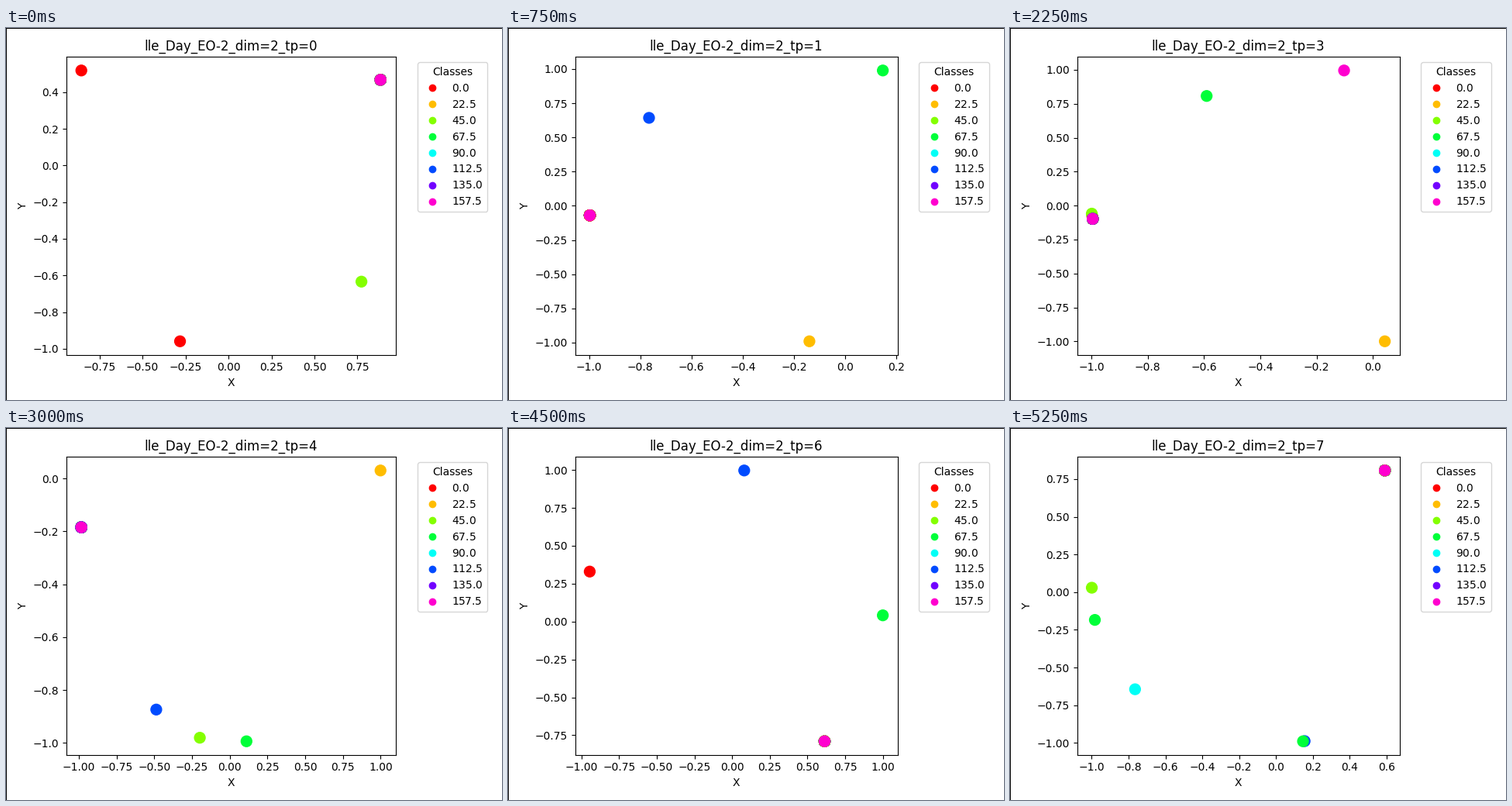
Write a matplotlib script that moves like this. It is 640 px wide and 480 px high and loops after 6 s.

```python
import random

import matplotlib.pyplot as plt
import numpy as np
from matplotlib.animation import FuncAnimation

STEP = 22.5
RED, ORANGE, LIME, GREEN, CYAN, BLUE, PURPLE, PINK = range(8)

# Nearly all points share one angle; a few outliers lie elsewhere on the circle.
SPARSE = {
    0: (27.85, {RED: (148.8, 253.65), LIME: (320.65,)}),
    1: (184, {GREEN: (81.5,), ORANGE: (262,), BLUE: (140,)}),
    3: (185.6, {GREEN: (126.2,), PINK: (95.9,), ORANGE: (272.4, 184.3),
                LIME: (183.4,)}),
    4: (190.63, {ORANGE: (1.75,), BLUE: (240.9,), LIME: (258.6,),
                 GREEN: (276.4,)}),
    5: (25, {RED: (152,), GREEN: (262,), CYAN: (320,)}),
    6: (307.8, {BLUE: (85.4,), RED: (160.75,), GREEN: (2.35,)}),
    7: (53.85, {LIME: (178.3,), CYAN: (220.1,), BLUE: (278.9,),
                GREEN: (190.6, 278.4)}),
}

# Evenly spaced arcs of the full ring: class, first angle, last angle, count.
ARCS = [
    (PURPLE, 57, 129, 5), (PURPLE, 297, 343, 2),
    (LIME, 62, 177, 7),
    (RED, 3.4, 11.2, 2), (RED, 275.2, 275.2, 1),
    (CYAN, 115, 231, 4), (CYAN, 292, 309, 2),
    (GREEN, 51, 237, 2), (GREEN, 97, 198, 9),
    (BLUE, 57.5, 104, 7), (BLUE, 129, 220, 5),
    (ORANGE, 43, 47, 3), (ORANGE, 154, 174, 2), (ORANGE, 205, 209, 3),
    (PINK, 163.5, 222, 2), (PINK, 26, 41, 12),
]


def crowd(angle, spread, rng):
    """Every class many times around one angle, in mixed order."""
    classes = list(range(8)) * 12
    rng.shuffle(classes)
    return [(angle + rng.uniform(-spread, spread), c) for c in classes]


def points(tp):
    rng = random.Random(tp)
    if tp in SPARSE:
        spot, outliers = SPARSE[tp]
        pairs = [(a, c) for c, angles in outliers.items() for a in angles]
        pairs += crowd(spot, 0, rng) + [(spot, PINK)]
    else:
        pairs = crowd(35.3, 5.4, rng)
        pairs += [(a, c) for c, *arc in ARCS for a in np.linspace(*arc)]
    angle, cls = np.array(pairs).T
    return np.cos(np.radians(angle)), np.sin(np.radians(angle)), cls * STEP


# A one-pixel edge that shows only along the top and the left.
fig = plt.figure(figsize=(6.4, 4.8), dpi=100, edgecolor="black", linewidth=0.72)


def draw(tp):
    fig.clear()
    fig.subplots_adjust(left=0.125, right=0.9, bottom=0.11, top=0.88)
    ax = fig.add_subplot()
    x, y, angle = points(tp)
    dots = ax.scatter(x, y, c=angle, s=100, cmap="hsv", vmin=0, vmax=180)
    ax.set_title(f"lle_Day_EO-2_dim=2_tp={tp}")
    ax.set_xlabel("X")
    ax.set_ylabel("Y")
    ax.legend(*dots.legend_elements(), title="Classes",
              bbox_to_anchor=(1.05, 1), loc="upper left")
    fig.tight_layout()
    return []


anim = FuncAnimation(fig, draw, frames=8, init_func=lambda: [], interval=750,
                     repeat=True, repeat_delay=0)
plt.show()
```
